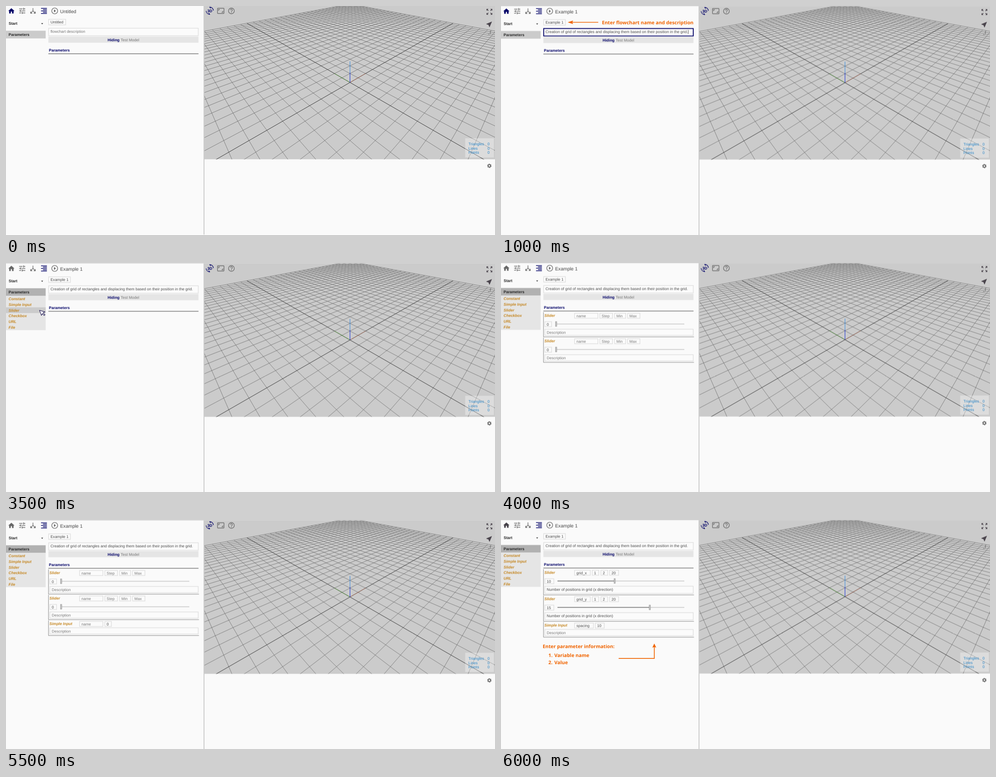
Recreate the animation shown at these times as an HTML page. Size 1091x513 px, loop 8.5 s.

```html
<!DOCTYPE html>
<html lang="en">
<head>
<meta charset="utf-8">
<title>Flowchart parameters</title>
<style>
  html, body { margin: 0; width: 100%; height: 100%; overflow: hidden; background: #fff; }
  svg { display: block; width: 1091px; height: 513px; }
  text { font: 8.53px "Liberation Sans", Arial, sans-serif; fill: #484848; text-rendering: geometricPrecision; white-space: pre; }
  .title { font-size: 10.6px; fill: #444; }
  .bold { font-weight: 700; fill: #222; }
  .navy { fill: #000066; }
  .hint { fill: #757575; }
  .item { font-weight: 700; font-style: italic; fill: #c58620; }
  .stat { fill: #2a86c8; }
  .note text { font: 700 10.8px "Open Sans", "Noto Sans", sans-serif; fill: #f06400; }
  .note path { fill: #f06400; }
  .note .line { fill: none; stroke: #f06400; stroke-width: 1.7; }
  .field { fill: #fbfbfb; stroke: #dedede; stroke-width: 1.4; }
  .focus { fill: #fbfbfb; stroke: #000066; stroke-width: 1.9; }
  .icon { fill: #6c6c6c; }
  .stroke { fill: none; stroke: #6c6c6c; stroke-width: 1.4; }
  .dark { fill: #4a444c; }

  .page, .home, .current, .cursor, [class^="on-"] { animation: 8.5s step-end infinite; }
  .page { animation-name: nudge; }
  .home { animation-name: home; }
  .current { animation-name: current; }
  .cursor { animation-name: cursor; }
  .on-blank { animation-name: blank; }
  .on-named { animation-name: named; }
  .on-typing { animation-name: typing; }
  .on-menu { animation-name: menu; }
  .on-pick-slider { animation-name: pick-slider; }
  .on-pick-input { animation-name: pick-input; }
  .on-empty { animation-name: empty; }
  .on-third { animation-name: third; }
  .on-filled { animation-name: filled; }

  @keyframes nudge {
    0% { transform: translateY(0); }
    11.7647%, 47.0588%, 70.5882%, 100% { transform: translateY(.6px); }
    35.2941%, 64.7058% { transform: translateY(1.2px); }
  }
  @keyframes home { 0% { fill: #000066; } 35.2941% { fill: #666; } 70.5882%, 100% { fill: #444048; } }
  @keyframes current { 0% { fill: #cbcbcb; } 35.2941%, 100% { fill: #b1b1b1; } }
  @keyframes cursor {
    0%, 47.0588%, 64.7058%, 100% { opacity: 0; transform: translate(74px, 62px); }
    35.2941% { opacity: 1; transform: translate(74px, 62px); }
    41.1764% { opacity: 1; transform: translate(74px, 105px); }
    58.8235% { opacity: 1; transform: translate(74px, 92px); }
  }
  @keyframes blank { 0% { opacity: 1; } 11.7647%, 100% { opacity: 0; } }
  @keyframes named { 0% { opacity: 0; } 11.7647%, 100% { opacity: 1; } }
  @keyframes typing { 0%, 35.2941%, 100% { opacity: 0; } 11.7647% { opacity: 1; } }
  @keyframes menu { 0% { opacity: 0; } 35.2941%, 100% { opacity: 1; } }
  @keyframes pick-slider { 0%, 47.0588%, 100% { opacity: 0; } 41.1764% { opacity: 1; } }
  @keyframes pick-input { 0%, 64.7058%, 100% { opacity: 0; } 58.8235% { opacity: 1; } }
  @keyframes empty { 0%, 70.5882%, 100% { opacity: 0; } 47.0588% { opacity: 1; } }
  @keyframes third { 0%, 70.5882%, 100% { opacity: 0; } 64.7058% { opacity: 1; } }
  @keyframes filled { 0% { opacity: 0; } 70.5882%, 100% { opacity: 1; } }
</style>
</head>
<body>
<svg id="stage" viewBox="0 0 1091 513"></svg>
<script>
const text = (x, y, words, cls = "") => `<text x="${x}" y="${y}" class="${cls}">${words}</text>`;
const rect = (x, y, w, h, fill) => `<rect x="${x}" y="${y}" width="${w}" height="${h}" fill="${fill}"/>`;
const box = (x, y, w, h, cls = "field") => `<rect x="${x}" y="${y}" width="${w}" height="${h}" class="${cls}"/>`;
const path = (d, cls, more = "") => `<path d="${d}" class="${cls}" ${more}/>`;
const group = (cls, ...parts) => `<g class="${cls}">${parts.join("")}</g>`;
const glyph = (cx, cy, scale, d, cls = "icon") =>
  path(d, cls, `transform="translate(${cx - 12 * scale} ${cy - 12 * scale}) scale(${scale})"`);

// Ground seen from (-80, -80, 80) with a 50 degree lens
function project(x, y, z = 0) {
  const focal = 171.6 / Math.tan(25 * Math.PI / 180);
  const depth = 80 * Math.sqrt(3) + (x + y - z) / Math.sqrt(3);
  const right = (x - y) / Math.SQRT2;
  const up = (x + y + 2 * z) / Math.sqrt(6);
  return [767.5 + focal * right / depth, 171.3 - focal * up / depth].map(n => n.toFixed(2));
}
const segment = (a, b) => `M${project(...a)}L${project(...b)}`;

function ground() {
  let lines = "", axes = "";
  for (let p = -250; p <= 250; p += 10) {
    const start = Math.max(-250, -150 - p);
    const pair = segment([p, start], [p, 250]) + segment([start, p], [250, p]);
    if (p) lines += pair; else axes += pair;
  }
  const axis = (end, color, width) =>
    `<path d="${segment([0, 0, 0], end)}" stroke="${color}" stroke-width="${width}"/>`;
  return `<g clip-path="url(#view)" fill="none">
    <path d="${lines}" stroke="#626262" stroke-width=".75"/>
    <path d="${axes}" stroke="#1c1c1c" stroke-width=".9"/>
    ${axis([20, 0, 0], "#c06a50", .7)}${axis([0, 20, 0], "#4c9a30", .8)}
    ${axis([0, 0, 10], "#2038d8", 1.1)}
    <path d="${segment([0, 0, 10], [0, 0, 20])}" stroke="#3d8fe0" stroke-width="1.1"/></g>`;
}

function viewer() {
  const stats = ["Triangles", "Lines", "Points"].map((name, i) =>
    text(1031.8, 312.2 + i * 9.6, name, "stat") + text(1074.3, 312.2 + i * 9.6, "0", "stat"));
  return rect(442.5, 0, 648.5, 343.4, "#cbcbcb") + ground() +
    rect(1024.5, 296.3, 64, 43, "rgba(255,255,255,.32)") + stats.join("") +
    `<text x="454.6" y="13.9" text-anchor="middle" class="bold navy">3D</text>` +
    `<g fill="none" stroke="#000066" stroke-width="1.2">
      <path d="M454 2.4A8.3 8.3 0 0 1 462.8 10.3M454 2.4L457 5.2M455 18.8A8.3 8.3 0 0 1 446.4 11M455 18.8L452 16"/></g>` +
    `<rect x="471.8" y="5" width="14.6" height="11.8" rx="1" class="stroke"/>` +
    path("M474.3 10.5V7.8H477M483.8 11.3V14H481.1", "stroke") +
    `<circle cx="502.9" cy="11" r="6.5" class="stroke"/>` +
    path("M500.6 9.4A2.2 2.2 0 1 1 503.9 11.2Q502.9 11.8 502.9 12.8M502.9 13.8V15.2", "stroke") +
    glyph(1078.5, 13, .72, "M15 3l2.3 2.3-2.89 2.87 1.42 1.42L18.7 6.7 21 9V3zM3 9l2.3-2.3 2.87 2.89 1.42-1.42L6.7 5.3 9 3H3zm6 12l-2.3-2.3 2.89-2.87-1.42-1.42L5.3 17.3 3 15v6zm12-6l-2.3 2.3-2.87-2.89-1.42 1.42 2.89 2.87L15 21h6z", "dark") +
    glyph(1078, 41, .7, "M21 3L3 10.53v.98l6.84 2.65L12.48 21h.98L21 3z", "dark") +
    path("M1082.5 55.4Q1080.6 55 1080.6 57V63.4M1079 58H1082.4M1075.5 63.2H1079", "stroke", 'style="stroke-width:1"');
}

function toolbar() {
  return glyph(12, 11.2, .7, "M10 20v-6h4v6h5v-8h3L12 3 2 12h3v8z", "home") +
    glyph(36.2, 11, .76, "M3 17v2h6v-2H3zM3 5v2h10V5H3zm10 16v-2h8v-2h-8v-2h-2v6h2zM7 9v2H3v2h4v2h2V9H7zm14 4v-2H11v2h10zm-6-4h2V7h4V5h-4V3h-2v6z") +
    path("M60.2 4.8V10.8L55.4 15.8M60.2 10.8L65 15.8M55 12.6V16.3H58.6M65.4 12.6V16.3H61.8", "stroke") +
    glyph(84.7, 11, .73, "M3 21h18v-2H3v2zm6-4h12v-2H9v2zm-6-4h18v-2H3v2zm6-4h12V7H9v2zM3 3v2h18V3H3z", "navy") +
    `<circle cx="108.7" cy="11" r="6.6" class="stroke"/>` + path("M107 7.8V14.2L111.5 11Z", "icon");
}

function sidebar() {
  const rows = ["Constant", "Simple Input", "Slider", "Checkbox", "URL", "File"];
  const rowTop = i => 72.6 + i * 12.75;
  return text(6, 42.2, "Start", "bold") + path("M78.5 38.6H82.9L80.7 41Z", "bold") +
    `<rect y="55.4" width="88.5" height="17.2" class="current"/>` + text(5.8, 67, "Parameters", "bold") +
    group("on-menu",
      rect(0, rowTop(0), 88.5, 76.7, "#e5e5e5"),
      group("on-pick-slider", rect(0, rowTop(2), 88.5, 12.75, "#cbcbcb")),
      group("on-pick-input", rect(0, rowTop(1), 88.5, 12.75, "#cbcbcb")),
      ...rows.map((name, i) => text(5.8, rowTop(i) + 9.4, name, "item")));
}

function header() {
  const sentence = "Creation of grid of rectangles and displacing them based on their position in the grid.";
  return group("on-blank", text(120.8, 16, "Untitled", "title"),
      box(95.2, 29.7, 38, 12.6), text(99.2, 39.1, "Untitled"),
      box(95.2, 49.7, 333.8, 16.8), text(99.2, 59.8, "flowchart description", "hint")) +
    group("on-named", text(120.8, 16, "Example 1", "title"),
      box(95.2, 29.7, 48.4, 12.6), text(99.2, 39.1, "Example 1"),
      box(95.2, 49.7, 333.8, 16.8),
      group("on-typing", box(95.3, 49.8, 333.6, 16.8, "focus"), rect(417.3, 53, .8, 9, "#222")),
      text(99.2, 59.9, sentence)) +
    rect(94.5, 68.4, 335, 13.9, "#e5e5e5") +
    text(226.8, 78.6, "Hiding", "bold navy") + text(256, 78.6, "Test Model", "hint") +
    text(95.8, 102.2, "Parameters", "bold navy") + rect(94.5, 106, 335, 2, "#979797");
}

// fields: [left, width, words]; slider: [value, box width, track start, thumb x]
function card(top, label, fields, slider, description) {
  const cls = description || !slider && fields[0][2] !== "name" ? "" : "hint";
  const isFilled = fields[0][2] !== "name";
  const tall = description ? 2.3 : 0;
  const shift = slider ? 0 : -21.4;
  const bottom = top + 55.9 + shift + tall;
  let out = path(`M94.8 ${top + .4}V${bottom}H430.5`, "", 'fill="none" stroke="#747474" stroke-width=".9"') +
    text(96.8, top + 10.9, label, "item");
  for (const [x, w, words] of fields) {
    const tone = isFilled || words === "0" ? "" : "hint";
    out += box(x, top + 2.8, w, 11.4) + text(x + 4, top + 11.6, words, tone);
  }
  if (slider) {
    const [value, width, start, thumb] = slider;
    out += box(97.8, top + 21.8, width, 11.4) + text(102, top + 30.6, value) +
      rect(start, top + 26.4, 409 - start, 1.3, "#bcbcbc") +
      rect(start, top + 26.4, thumb - start, 1.3, "#606060") +
      `<rect x="${thumb - 1.4}" y="${top + 21.8}" width="2.8" height="10.4" fill="#ccc" stroke="#8a8a8a" stroke-width=".8"/>`;
  }
  return out + box(97.8, top + 38.6 + shift, 331, 14 + tall) +
    text(102, top + 48.8 + shift, description || "Description", description ? cls : "hint");
}

function cards() {
  const blank = [[164.2, 52, "name"], [220.6, 28.2, "Step"], [253.6, 24.6, "Min"], [282.6, 27.4, "Max"]];
  const filled = name => [[164.2, 35, name], [203.6, 14.4, "1"], [223, 15, "2"], [242.4, 20, "20"]];
  const blankSlider = top => card(top, "Slider", blank, ["0", 15, 123, 123]);
  const note = "Number of positions in grid (x direction)";
  return group("on-empty", blankSlider(109), blankSlider(166.1)) +
    group("on-third", card(223.1, "Simple Input", [[164.2, 52, "name"], [220.6, 14.6, "0"]])) +
    group("on-filled",
      card(109, "Slider", filled("grid_x"), ["10", 20, 126, 253.6], note),
      card(168.2, "Slider", filled("grid_y"), ["15", 20, 126, 332], note),
      card(227.4, "Simple Input", [[164.2, 42, "spacing"], [210.4, 20, "10"]]));
}

function notes() {
  return group("on-typing", group("note",
      text(225.2, 40.5, "Enter flowchart name and description"),
      path("M217 36.5H158", "line"), path("M148.8 36.5L161 32.6L158.8 36.5L161 40.4Z", ""))) +
    group("on-filled", group("note",
      text(93, 286.9, "Enter parameter information:"),
      text(105.8, 307.2, "1."), text(119, 307.2, "Variable name"),
      text(105.8, 322.7, "2."), text(119, 322.7, "Value"),
      path("M262.5 310.2H342V283", "line"), path("M342 276.8L346.4 286L342 284.2L337.6 286Z", "")));
}

const gear = `<g fill="none" stroke="#6c6c6c"><circle cx="1078.4" cy="358" r="2.8" stroke-width="2"/>
  <circle cx="1078.4" cy="358" r="4" stroke-width="1.4" stroke-dasharray="2.4 1.789"/></g>`;
const pointer = `<path class="cursor" d="M.8 1L13 4.6L8.8 6.6L13 11L11.2 12.6L7 8.4L5 12.4Z"
  fill="#fff" stroke="#1c1450" stroke-width="1.1" stroke-linejoin="round"/>`;

document.getElementById("stage").innerHTML =
  `<defs><clipPath id="view"><rect x="442.5" width="648.5" height="343.4"/></clipPath></defs>` +
  group("page",
    rect(0, -2, 1091, 2, "#d6d6d6"), rect(0, 0, 1091, 512, "#fafafa"),
    viewer(), rect(440.9, 0, 1.7, 512, "#c3c3c3"), gear,
    toolbar(), sidebar(), header(), cards()) +
  notes() + pointer;
</script>
</body>
</html>
```
